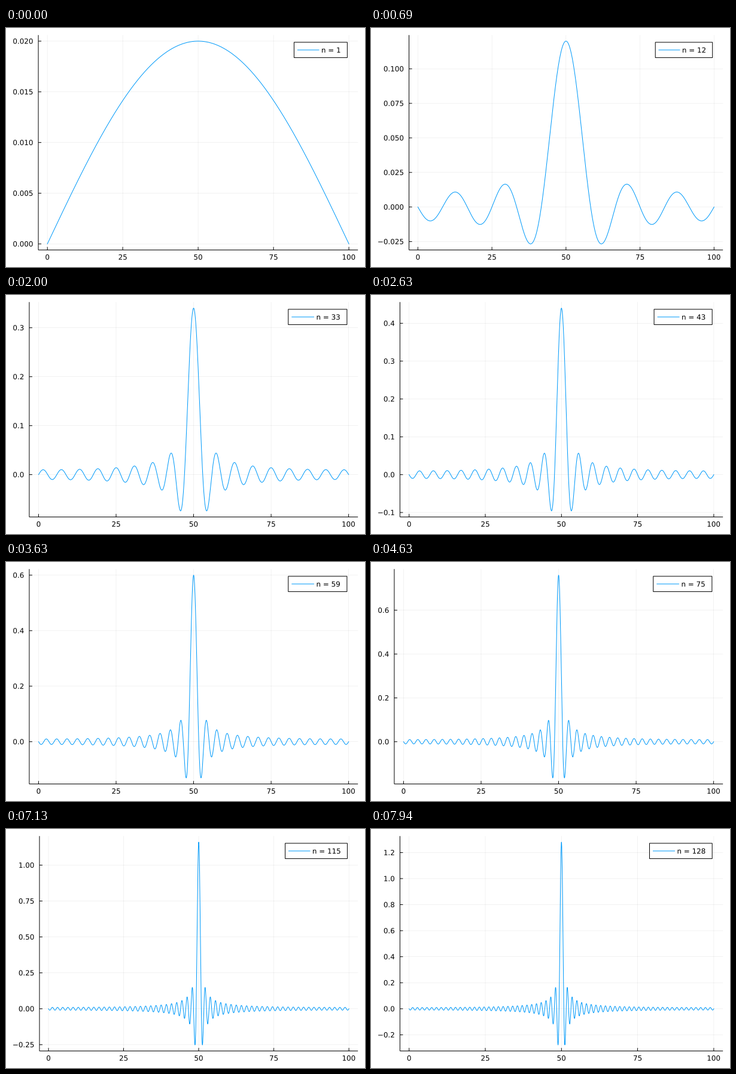
Animation of 600 by 400 pixels, one loop 8 s. Source, as a matplotlib script:

```python
import math

import matplotlib.pyplot as plt
import numpy as np
from matplotlib.animation import FuncAnimation
from matplotlib.collections import LineCollection
from matplotlib.patches import PathPatch, Rectangle
from matplotlib.path import Path
from matplotlib.textpath import TextPath
from matplotlib.transforms import Affine2D

W, H, DPI = 600, 400, 100
TERMS, LOOP = 128, 8000
PX = 72 / DPI
EM = 11.9
MARGIN = 11.81
RIGHT, TOP, BOTTOM = W - MARGIN, H - MARGIN, H - 371.5
LABEL_LEFT, LABEL_GAP, TICK = 12.15, 8.6, 5
BLUE = "#009AFA"
NICE = ((1, 1.0), (5, 0.9), (2, 0.7), (2.5, 0.5), (3, 0.2))

X = np.linspace(0, 100, 2001)


def partial_sum(n):
    """Sine series of a unit spike in the middle of the interval."""
    k = np.arange(1, n + 1, 2)
    signs = np.where(k % 4 == 1, 1, -1)
    return 0.02 * signs @ np.sin(np.outer(k, X) * math.pi / 100)


def widen(lo, hi):
    pad = 0.03 * (hi - lo)
    return lo - pad, hi + pad


def pick_ticks(lo, hi):
    """Best scored round ticks inside the limits, with their decimals."""
    span, best = hi - lo, (-1, None, 0)
    top = math.ceil(math.log10(span))
    for z in range(top, top - 3, -1):
        for q, nice in NICE:
            step = q * 10.0 ** z
            first, last = math.ceil(lo / step), math.floor(hi / step)
            count = last - first + 1
            if not 4 <= count <= 8:
                continue
            grain = 1 - abs(count - 5) / 5
            cover = 1.5 * span / ((count - 1) * step)
            score = grain / 4 + (first <= 0 <= last) / 6 + cover / 3 + nice / 4
            if score > best[0]:
                decimals = max(0, -z + (q == 2.5))
                best = score, np.arange(first, last + 1) * step, decimals
    return best[1:]


def outline(text):
    return TextPath((0, 0), text, size=EM, prop="DejaVu Sans")


def measure(text):
    """Outline, left edge of its ink and pen advance."""
    path = outline(text)
    advance = outline(text + "0").get_extents().x1 - outline("0").get_extents().x1
    return path, path.get_extents().x0, advance


def move(path, dx, dy):
    return Affine2D().translate(dx, dy).transform_path(path)


def centred(text, x, y):
    path = outline(text)
    box = path.get_extents()
    return move(path, x - (box.x0 + box.x1) / 2, y)


fig = plt.figure(figsize=(W / DPI, H / DPI), dpi=DPI, facecolor="white")
ax = fig.add_axes([0, 0, 1, 1])
ax.set(xlim=(0, W), ylim=(0, H))
ax.axis("off")

grid = LineCollection([], colors=[(0, 0, 0, 0.1)], linewidths=0.5 * PX, zorder=1)
frame = LineCollection([], colors="black", linewidths=PX, zorder=2)
for lines in (grid, frame):
    ax.add_collection(lines, autolim=False)
curve, = ax.plot([], [], color=BLUE, lw=PX, zorder=3)
box = ax.add_patch(Rectangle((0, 0), 1, 1, fc="white", ec="black", lw=PX, zorder=4))
key, = ax.plot([], [], color=BLUE, lw=PX, zorder=5)
words = ax.add_patch(PathPatch(Path([(0, 0)]), fc="black", lw=0, zorder=6))
for artist in (grid, frame, curve, box, key):
    artist.set_snap(False)


def draw(i):
    n = i + 1
    y = partial_sum(n)
    lo, hi = widen(y.min(), y.max())
    ticks, decimals = pick_ticks(lo, hi)
    labels = [measure(f"{t + 0.0:.{decimals}f}".replace("-", "\u2212")) for t in ticks]
    left = LABEL_LEFT + max(adv - x0 for _, x0, adv in labels) + LABEL_GAP
    width = RIGHT - left

    def px(v):
        return left + (v + 3) / 106 * width

    def py(v):
        return BOTTOM + (v - lo) / (hi - lo) * (TOP - BOTTOM)

    xs = [(v, px(v)) for v in range(0, 101, 25)]
    ys = [py(t) for t in ticks]
    grid.set_segments([[(x, BOTTOM), (x, TOP)] for _, x in xs]
                      + [[(left, v), (RIGHT, v)] for v in ys])
    frame.set_segments([[(left, BOTTOM), (RIGHT, BOTTOM)], [(left, BOTTOM), (left, TOP)]]
                       + [[(x, BOTTOM), (x, BOTTOM + TICK)] for _, x in xs]
                       + [[(left, v), (left + TICK, v)] for v in ys])
    curve.set_data(px(X), py(y))

    # The legend scales with the plot width.
    unit = width / 45
    title, title_x0, title_adv = measure(f"n = {n}")
    end = RIGHT - 1.5 * unit
    start = end - (title_adv - title_x0) - 4.833 * unit
    box.set_bounds(start, H - 49.6, end - start, 25.7)
    key.set_data([start + 0.5 * unit, start + 3.5 * unit], [H - 36.8] * 2)

    parts = [move(path, left - LABEL_GAP - adv, v - 0.365 * EM)
             for (path, _, adv), v in zip(labels, ys)]
    parts += [centred(str(v), x, H - 387.7) for v, x in xs]
    parts.append(move(title, start + 3.833 * unit, H - 41.2))
    words.set_path(Path.make_compound_path(*parts))
    return grid, frame, curve, box, key, words


anim = FuncAnimation(fig, draw, frames=TERMS, interval=LOOP / TERMS,
                     init_func=lambda: draw(0), repeat=True, repeat_delay=0, blit=False)
plt.show()
```
